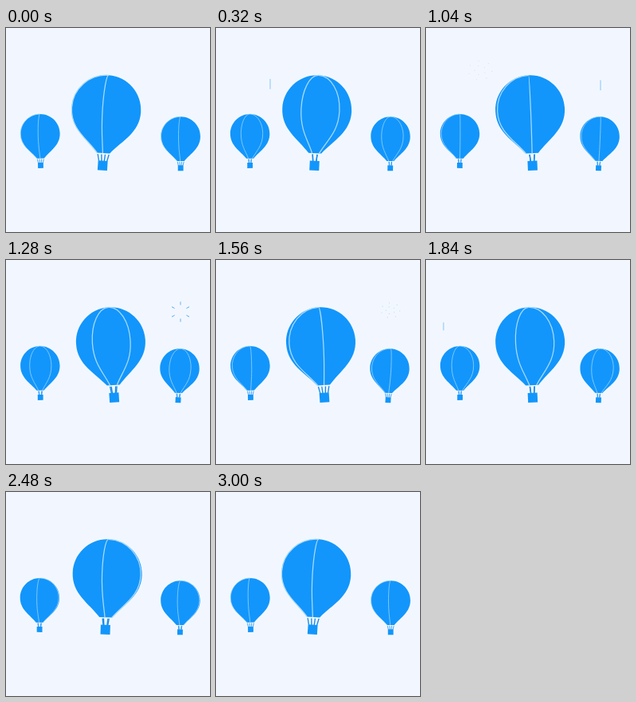
An HTML page for the animation above (3040 ms loop, 256 by 256 pixels).

```html
<!DOCTYPE html>
<html lang="en">
<head>
<meta charset="utf-8">
<title>Balloons</title>
<style>
  html, body { margin: 0; width: 100%; height: 100%; overflow: hidden; background: #f2f7ff; }
  svg { display: block; width: 100vw; height: 100vh; }
  .skin { fill: #1296fb; }
  .seam { fill: none; stroke: #abdafd; stroke-width: 1.25; }
  .rope { stroke: #178bea; stroke-width: 1.35; }
  .trail { stroke: #2c9cf0; stroke-width: 1; }
  .ray { stroke: #2c9cf0; stroke-width: 0.85; }
  .dot { fill: #2c9cf0; }
</style>
</head>
<body>
<svg id="stage" viewBox="0 0 256 256"></svg>
<script>
const LOOP = 3040;
const SPIN = 1000;
const stage = document.getElementById('stage');
const wave = (t, period, shift = 0) => Math.cos(2 * Math.PI * (t + shift) / period);
const span = (v, a, b) => Math.min(1, Math.max(0, (v - a) / (b - a)));
const easeOut = (p, power) => 1 - (1 - p) ** power;

function add(parent, tag, attrs) {
  const el = document.createElementNS('http://www.w3.org/2000/svg', tag);
  set(el, attrs);
  parent.append(el);
  return el;
}

function set(el, attrs) {
  for (const name in attrs) el.setAttribute(name, attrs[name]);
}

// One side of the envelope; k runs from -1 (left edge) to 1 (right edge).
const side = k =>
  `M0 0C${24 * k} 0 ${43.5 * k} 19.5 ${43.5 * k} 43.5C${43.5 * k} 70 ${22 * k} 81 ${8 * k} 98`;

// A seam crosses in two legs, left edge to near the middle, then to the right edge.
const seamPlace = leg => leg < 1
  ? -1 + 0.885 * leg ** 1.1
  : -0.115 + 1.115 * (leg - 1) ** 0.85;

function balloon(x, y, scale, angle) {
  const g = add(stage, 'g', {});
  const ropes = [0, 1, 2, 3].map(() => add(g, 'line', { class: 'rope', y1: 99.5, y2: 108 }));
  add(g, 'rect', { class: 'skin', x: -6, y: 107.5, width: 12, height: 12 });
  add(g, 'path', { class: 'skin', d: side(1) + 'H-8C-22 81 -43.5 70 -43.5 43.5C-43.5 19.5 -24 0 0 0Z' });
  const seams = [0, 1].map(() => add(g, 'path', { class: 'seam' }));

  return t => {
    set(g, { transform: `translate(${x} ${y}) rotate(${angle(t)}) scale(${scale})` });
    seams.forEach((seam, i) => set(seam, { d: side(seamPlace((2 * t / SPIN + i) % 2)) }));
    const c = wave(t, 750);
    const outer = 4.8 + 2.2 * c;
    const inner = 2.65 - 0.35 * c;
    [-outer, -inner, inner, outer].forEach((r, i) => set(ropes[i], { x1: r, x2: r * 0.72 }));
  };
}

// A trail climbs, opens into six rays, then scatters as fading dots.
function firework(x, from, to, radius, start, duration) {
  const trail = add(stage, 'line', { class: 'trail', x1: x, x2: x });
  const rays = Array.from({ length: 6 }, (_, i) =>
    add(stage, 'line', { class: 'ray', transform: `translate(${x} ${to}) rotate(${i * 60})` }));
  const ring = (count, reach, turn) => Array.from({ length: count }, (_, i) => {
    const a = turn + 2 * Math.PI * i / count;
    const el = add(stage, 'circle', { class: 'dot', r: 0.6 });
    return { el, dx: Math.cos(a) * reach * radius, dy: Math.sin(a) * reach * radius * 0.8 };
  });
  const dots = [...ring(7, 0.93, 0.1), ...ring(5, 0.45, 0.6)];
  const rise = p => from + (to - from) * easeOut(p, 2);

  return t => {
    const f = span(t, start, start + duration);

    const climb = span(f, 0, 0.44);
    const tail = Math.max(climb / 2, span(f, 0.4, 0.5));
    set(trail, { y1: rise(climb), y2: rise(tail), opacity: climb > 0 && tail < 1 ? 0.55 : 0 });

    const open = span(f, 0.44, 0.74);
    rays.forEach(ray => set(ray, {
      y1: -radius * open ** 0.85,
      y2: -radius * easeOut(open, 4),
      opacity: open > 0 && open < 1 ? 1 - open ** 4 : 0
    }));

    const spread = easeOut(span(f, 0.62, 0.95), 2);
    const opacity = f > 0.68 ? 0.8 * (1 - span(f, 0.7, 1)) : 0;
    dots.forEach(({ el, dx, dy }) =>
      set(el, { cx: x + dx * spread, cy: to + (dy - 2) * spread, opacity }));
  };
}

const parts = [
  firework(68, 95, 55, 16, 80, 1040),
  firework(219, 109, 65, 13, 620, 1060),
  firework(22, 113, 78, 13, 1560, 700),
  balloon(42.6, 108, 0.568, t => -0.8 * wave(t, LOOP / 2, 40)),
  balloon(219.2, 111.3, 0.568, t => 1.45 - 1.45 * wave(t, LOOP, 70)),
  balloon(128.7, 59.3, 1, t => 3.8 * wave(t, LOOP, 70))
];

const begin = performance.now();
function draw() {
  const t = (performance.now() - begin) % LOOP;
  parts.forEach(part => part(t));
  requestAnimationFrame(draw);
}
draw();
</script>
</body>
</html>
```
